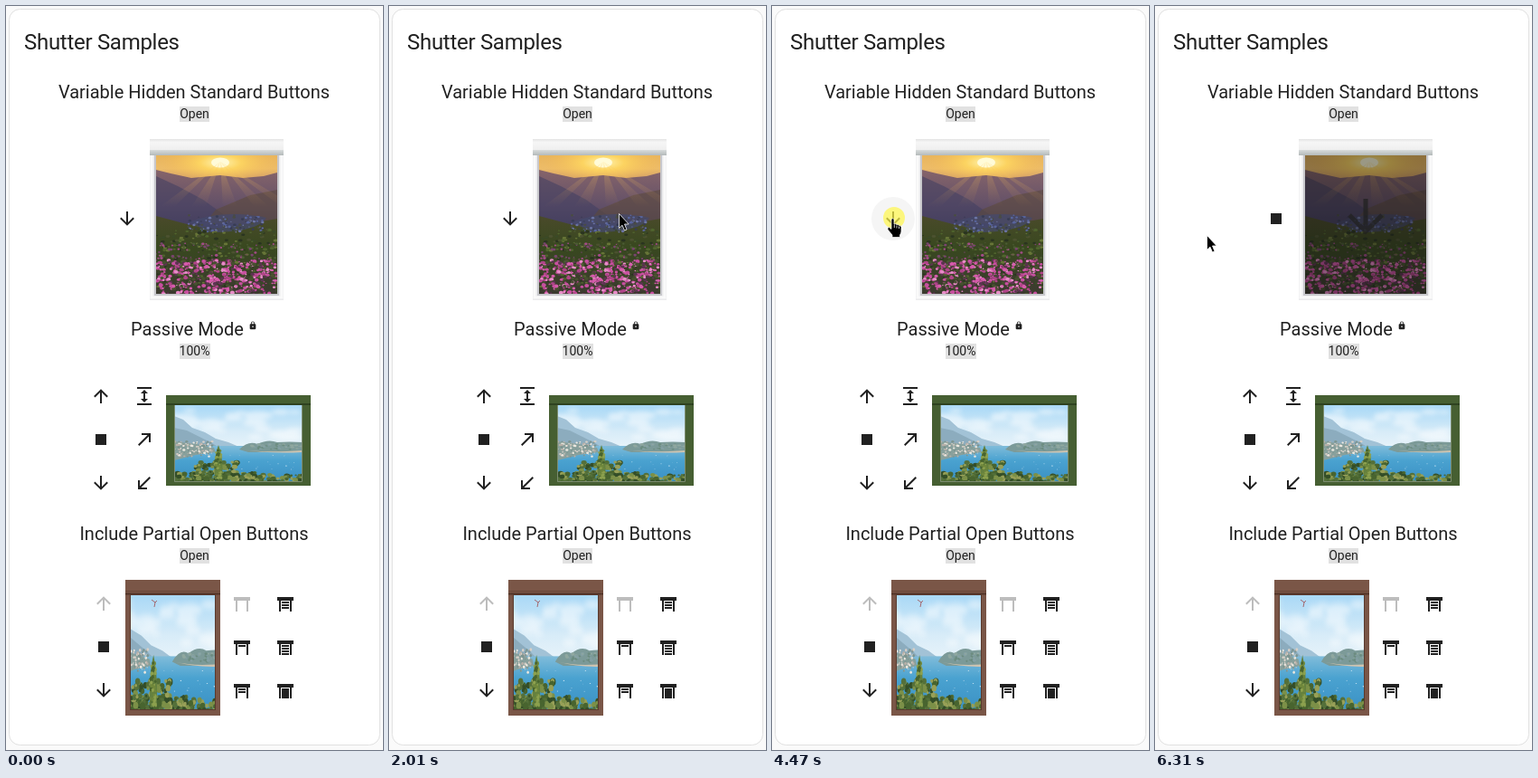
Animation of 417 by 822 pixels, one loop 8000 ms. Source, as an HTML page:

```html
<!DOCTYPE html>
<html lang="en">
<head>
<meta charset="utf-8">
<title>Shutter Samples</title>
<style>
  html, body { margin: 0; width: 100%; height: 100%; overflow: hidden; background: #fafafa; }
  svg { display: block; }
  text { font-family: Roboto, Arial, sans-serif; fill: #212121; }
  .name { font-size: 20px; text-anchor: middle; }
  .state { font-size: 14px; text-anchor: middle; }
  .icon { fill: #212121; }
  .off { fill: #bdbdbd; }
</style>
</head>
<body>
<svg id="stage" width="417" height="822" viewBox="0 0 417 822">
  <defs>
    <linearGradient id="dusk" x2="0" y2="1">
      <stop offset="0" stop-color="#e8b45c"/><stop offset=".1" stop-color="#edbc68"/>
      <stop offset=".2" stop-color="#c89468"/>
    </linearGradient>
    <linearGradient id="ridge" x2="0" y2="1">
      <stop offset="0" stop-color="#86646a"/><stop offset=".5" stop-color="#625068"/><stop offset="1" stop-color="#3a3858"/>
    </linearGradient>
    <linearGradient id="meadow" x2="0" y2="1">
      <stop offset="0" stop-color="#4a4a2a"/><stop offset=".4" stop-color="#38481f"/><stop offset="1" stop-color="#3c3a30"/>
    </linearGradient>
    <radialGradient id="glow">
      <stop offset="0" stop-color="#fff6b8"/><stop offset=".35" stop-color="#ffd860" stop-opacity=".85"/>
      <stop offset="1" stop-color="#f4b850" stop-opacity="0"/>
    </radialGradient>
    <linearGradient id="ray" x2="0" y2="1">
      <stop offset="0" stop-color="#ffd060" stop-opacity=".3"/><stop offset="1" stop-color="#e0a050" stop-opacity="0"/>
    </linearGradient>
    <linearGradient id="sky" x2="0" y2="1">
      <stop offset="0" stop-color="#a8d8f6"/><stop offset=".6" stop-color="#d8ecf8"/><stop offset="1" stop-color="#eaf4fa"/>
    </linearGradient>
    <linearGradient id="sea" x2="0" y2="1">
      <stop offset="0" stop-color="#80bcda"/><stop offset=".4" stop-color="#4aa2d0"/><stop offset="1" stop-color="#3a90c4"/>
    </linearGradient>
    <linearGradient id="box" x2="0" y2="1">
      <stop offset="0" stop-color="#e4e4e4"/><stop offset=".2" stop-color="#f6f6f6"/><stop offset=".65" stop-color="#efefef"/>
      <stop offset=".7" stop-color="#d4d8d8"/><stop offset="1" stop-color="#b4baba"/>
    </linearGradient>
    <filter id="soft"><feGaussianBlur stdDeviation="2.500"/></filter>
    <clipPath id="hillClip"><rect x="166" y="165" width="134" height="153"/></clipPath>
    <clipPath id="bayClip"><rect width="142" height="85"/></clipPath>
    <clipPath id="tallClip"><rect x="138" y="650" width="93" height="128"/></clipPath>
  </defs>

  <rect width="417" height="822" fill="#fafafa"/>
  <rect x="3.5" y="3.5" width="410" height="813" rx="12" fill="#fff" stroke="#e0e0e0"/>
  <text x="20" y="48" font-size="24" letter-spacing="-.288">Shutter Samples</text>
  <g id="labels"></g>

  <rect x="159" y="147" width="148" height="178" fill="#ececee"/>
  <path d="M161 165V322H305V165" fill="none" stroke="#fafafa" stroke-width="3"/>
  <path d="M165 165V319H301V165" fill="none" stroke="#c8c8cc" stroke-width="2"/>
  <rect x="159" y="147" width="148" height="18" fill="url(#box)"/>
  <g id="hills" clip-path="url(#hillClip)"></g>

  <rect x="177" y="430" width="160" height="100" fill="#465f32"/>
  <path d="M177 440H337" stroke="#2e4220" stroke-width="2"/>
  <g id="wide" transform="translate(186 441)" clip-path="url(#bayClip)"></g>
  <path d="M186.500 441V525.500H327.500V441" fill="none" stroke="#7c8c70"/>

  <rect x="132" y="634" width="105" height="150" fill="#7a5647"/>
  <path d="M132 646.500H237" stroke="#694638"/><path d="M132 649.500H237" stroke="#523428" stroke-width="2"/>
  <g clip-path="url(#tallClip)"><g id="tall" transform="translate(119 650) scale(.9 1.52)"></g>
    <path d="M161 656l4 3 2-2M165 659l-1 5" fill="none" stroke="#a04848" stroke-width=".8"/></g>
  <rect x="137.500" y="650.500" width="94" height="127" fill="none" stroke="#5a3a2e"/>

  <g id="dim">
    <rect x="166" y="165" width="134" height="153" fill="#101010" opacity=".42"/>
    <g id="bigArrow" opacity=".75"></g>
  </g>
  <circle id="hover" cx="134" cy="235" r="24" fill="#f5f5f5"/>
  <circle id="ripple" cx="134" cy="235" fill="#000"/>
  <g id="down"></g><g id="stop"></g>
  <g id="icons"></g>
  <circle id="click" cx="135" cy="234" r="12" fill="#fff64a" opacity=".7"/>
  <g id="tip">
    <rect x="2" y="2" width="75" height="23" fill="#000" opacity=".14"/>
    <rect x=".5" y=".5" width="74" height="21" fill="#fff" stroke="#767676"/>
    <text x="37.500" y="15" font-size="12" text-anchor="middle" style="fill:#575757;font-family:'Open Sans',sans-serif" letter-spacing="-.2">Close cover</text>
  </g>
  <g id="cursor">
    <path id="arrow" d="M.5 .5V16.500L4 13.200L6.500 19L9 18L6.500 12H11.200Z" stroke="#fff" stroke-width=".8"/>
    <g id="hand">
      <path d="M5 1.500Q6.500 0 8 1.500V7Q9.500 6 11 7.600Q12.500 7 13.500 8.600Q15.700 8 16 10.500V15Q16 17 14.500 19V21.500H6V19L1 13Q.5 10.500 2.500 10.500L5 12.500Z" stroke="#fff" stroke-width=".7"/>
      <path d="M8.300 7.500V11M11 8.500V11.500M13.500 9.500V12" stroke="#fff" stroke-width=".8"/>
    </g>
  </g>
</svg>
<script>
const $ = id => document.getElementById(id);

const shapes = {
  up: 'M13 20H11V8L5.500 13.500L4.080 12.080L12 4.160L19.920 12.080L18.500 13.500L13 8Z',
  down: 'M11 4H13V16L18.500 10.500L19.920 11.920L12 19.840L4.080 11.920L5.500 10.500L11 16Z',
  stop: 'M6 6H18V18H6Z',
  expand: 'M13 9V15H16L12 19L8 15H11V9H8L12 5L16 9ZM4 2H20V4H4ZM4 20H20V22H4Z',
  upRight: 'M5 17.590L15.590 7H9V5H19V15H17V8.410L6.410 19Z',
  downLeft: 'M19 6.410L17.590 5L7 15.590V9H5V19H15V17H8.410Z',
  lock: 'M12 17A2 2 0 0 0 12 13A2 2 0 0 0 12 17M18 8A2 2 0 0 1 20 10V20A2 2 0 0 1 18 22H6A2 2 0 0 1 4 20V10A2 2 0 0 1 6 8H7V6A5 5 0 0 1 17 6V8ZM12 3A3 3 0 0 0 9 6V8H15V6A3 3 0 0 0 12 3Z'
};
const slats = n => 'M3 4H21V8H19V20H17V8H7V20H5V8H3Z' +
  Array.from({ length: n }, (_, i) => `M8 ${9 + 3 * i}H16v2H8Z`).join('');

function icon(d, x, y, size = 24, cls = 'icon') {
  const k = size / 24;
  return `<path class="${cls}" d="${d}" transform="translate(${x - size / 2} ${y - size / 2}) scale(${k})"/>`;
}

function random(seed) {
  return () => (seed = seed * 16807 % 2147483647) / 2147483647;
}
const path = (d, fill, extra = '') => `<path d="${d}" fill="${fill}" ${extra}/>`;

// Scatter n blobs in a box, cycling through the colours.
function scatter(rnd, n, x, y, w, h, r, colors, flat = .8) {
  let out = '';
  for (let i = 0; i < n; i++) {
    const s = r * (.5 + rnd());
    out += `<ellipse cx="${(x + rnd() * w).toFixed(1)}" cy="${(y + rnd() * h).toFixed(1)}" rx="${s.toFixed(1)}" ry="${(s * flat).toFixed(1)}" fill="${colors[i % colors.length]}"/>`;
  }
  return out;
}

function hills() {
  const rnd = random(11);
  let rays = '';
  for (const x of [170, 205, 240, 275, 305])
    rays += path(`M237 172L${x} 222H${x + 16}Z`, 'url(#ray)');
  return '<rect x="166" y="164" width="134" height="155" fill="url(#dusk)"/>' +
    '<ellipse cx="237" cy="173" rx="66" ry="24" fill="url(#glow)"/>' +
    path('M166 181L182 185L205 190L237 187L262 190L285 188L300 184V260H166Z', 'url(#ridge)') +
    path('M166 188L190 199L218 214L240 230L260 256H166Z', '#403e62', 'opacity=".55"') +
    path('M300 203L270 209L232 225L220 240H300Z', '#5c4a3c', 'opacity=".6"') +
    '<ellipse cx="237" cy="173" rx="10" ry="5.500" fill="#fffbd8"/>' + rays +
    path('M166 232L200 241L230 246L265 241L300 235V319H166Z', 'url(#meadow)') +
    path('M202 239Q240 224 288 234Q278 250 226 250Z', '#444a6c', 'opacity=".75"') +
    scatter(rnd, 110, 202, 231, 82, 19, 1.2, ['#58649c', '#383c54', '#6c74a4', '#4a4c44']) +
    scatter(rnd, 300, 166, 247, 134, 68, 1.8, ['#50652e', '#2a3420', '#687638', '#3a4a28', '#4c5230'], .6) +
    scatter(rnd, 130, 166, 262, 134, 24, 1.2, ['#a44c88', '#7a4470', '#4c5c34']) +
    scatter(rnd, 520, 166, 281, 134, 38, 1.7, ['#d65cac', '#b04488', '#e88cc8', '#5c3450', '#c850a0', '#46502f']);
}

function bay() {
  const rnd = random(29);
  const leaves = ['#54703a', '#344e28', '#7c9048', '#48642f', '#98a058'];
  return '<rect width="142" height="50" fill="url(#sky)"/>' +
    `<g opacity=".5" filter="url(#soft)">${scatter(rnd, 26, 0, 4, 142, 32, 11, ['#fff'], .3)}</g>` +
    path('M0 12L10 16L20 25L34 30L46 37L60 41L74 47H0Z', '#a2c2d6') +
    path('M0 25L14 28L28 35L42 42L50 47H0Z', '#8cacbe') +
    '<rect y="45" width="142" height="40" fill="url(#sea)"/>' +
    path('M0 40L24 43L44 47L46 52L24 55L0 61Z', '#88a09c') +
    scatter(rnd, 120, 0, 40, 42, 17, 1.1, ['#ece8e0', '#b8b0a8', '#7c9490', '#d8d0c8']) +
    path('M72 49Q82 39 92 43Q104 37 114 41Q128 40 142 41V52H82Z', '#7c9a98') +
    scatter(rnd, 55, 82, 43, 60, 6, 1.6, ['#6c8c80', '#90a8a0', '#84a0a4'], .5) +
    path('M76 49Q100 53 142 50V52Q105 54 76 49Z', '#cfc4b0') +
    scatter(rnd, 18, 60, 55, 78, 16, .7, ['#c4e2f2', '#84bede'], .5) +
    scatter(rnd, 150, 0, 74, 90, 11, 2.4, leaves) +
    scatter(rnd, 110, 22, 63, 48, 20, 2.4, leaves) +
    scatter(rnd, 80, 82, 77, 60, 8, 2.2, leaves) +
    path('M49 44Q55 60 53 82H45Q43 60 49 44Z', '#64803f') +
    scatter(rnd, 45, 46, 50, 6, 32, 1.5, ['#8ca04e', '#48642f', '#70883c']);
}

const label = (title, state, x, y) =>
  `<text class="name" x="${x}" y="${y}">${title}</text>
   <rect x="192" y="${y + 9}" width="${state === '100%' ? 34 : 33}" height="17" fill="#e1e1e1"/>
   <text class="state" x="208.500" y="${y + 22}">${state}</text>`;

$('labels').innerHTML = label('Variable Hidden Standard Buttons', 'Open', 208, 102) +
  label('Passive Mode', '100%', 200.5, 364) + label('Include Partial Open Buttons', 'Open', 208, 590);
$('hills').innerHTML = hills();
$('wide').innerHTML = $('tall').innerHTML = bay();
$('down').innerHTML = icon(shapes.down, 134, 235);
$('stop').innerHTML = icon(shapes.stop, 134, 235);
$('bigArrow').innerHTML = icon(shapes.down, 233, 233, 60);

const column = (list, x, y, fade) =>
  list.map((d, i) => icon(d, x, y + 48 * i, 24, fade && !i ? 'off' : 'icon')).join('');
const { up, down, stop, expand, upRight, downLeft, lock } = shapes;
$('icons').innerHTML = icon(lock, 273, 353, 10) +
  column([up, stop, down], 105, 431) + column([expand, upRight, downLeft], 153, 431) +
  column([up, stop, down], 108, 660, true) +
  column([0, 1, 2].map(slats), 261, 661, true) +
  column([slats(3), slats(4), slats(0) + 'M8 9H16V20H8Z'], 309, 661);

// Pointer stops: time, x, y, and 1 for the hand.
const stops = [
  [290, 382, 800], [420, 379, 718], [580, 380, 652], [700, 376, 587, 1], [850, 384, 515], [980, 377, 445],
  [1140, 373, 396], [1290, 362, 349, 1], [1430, 358, 293], [1580, 332, 268], [1700, 308, 246], [1850, 278, 232],
  [2010, 254, 229], [2140, 211, 221], [2270, 170, 214], [2420, 152, 210], [2570, 135, 213, 1], [2700, 121, 220, 1],
  [2850, 126, 229, 1], [2980, 129, 236, 1], [3600, 128, 235, 1], [3880, 127, 234, 1], [5580, 115, 234, 1],
  [5750, 107, 238], [5890, 87, 245], [6020, 68, 251], [6170, 59, 252], [6310, 57, 253]
];
const show = (id, on) => $(id).style.display = on ? '' : 'none';

function draw(now) {
  const t = now % 8000;
  const within = (a, b) => t >= a && t < b;
  const at = stops.filter(s => s[0] <= t).pop();
  show('cursor', at);
  if (at) {
    $('cursor').setAttribute('transform', `translate(${at[1]} ${at[2]})`);
    show('hand', at[3]);
    show('arrow', !at[3]);
  }
  show('hover', within(2570, 5750));
  show('click', within(4470, 4880));
  show('ripple', within(4600, 5010));
  $('ripple').setAttribute('r', t < 4740 ? 16 : 24);
  $('ripple').setAttribute('opacity', t < 4880 ? .1 : .05);
  show('tip', within(3460, 4470) || within(5580, 5750));
  $('tip').setAttribute('transform', t < 5000 ? 'translate(147 251)' : 'translate(141 249)');
  const closing = t >= 5160;
  show('dim', closing);
  show('stop', closing);
  show('down', !closing);
  requestAnimationFrame(draw);
}
requestAnimationFrame(draw);
</script>
</body>
</html>
```
